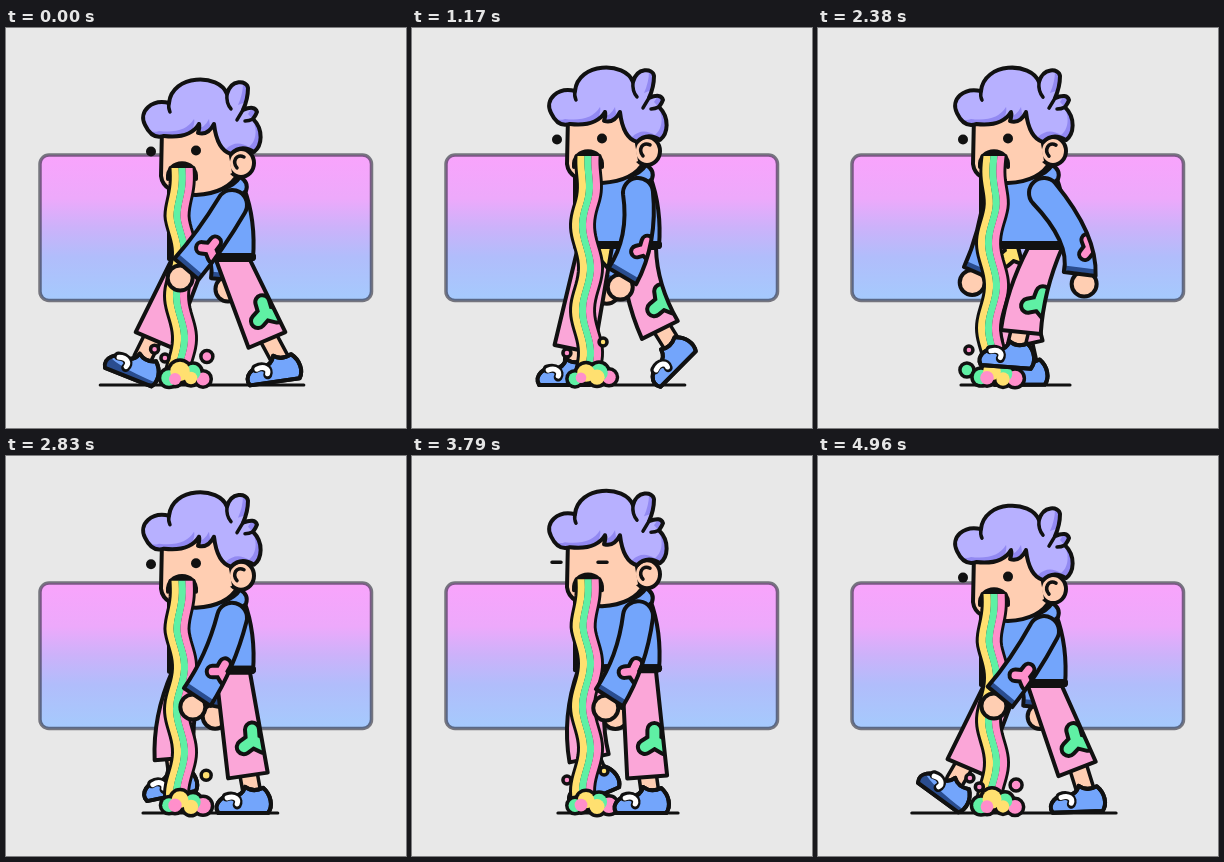
Animation of 400 by 400 pixels, one loop 5000 ms. Source, as an HTML page with a canvas:

```html
<!DOCTYPE html>
<html>
<head>
<meta charset="utf-8">
<style>
html, body { margin: 0; height: 100%; overflow: hidden; background: #e8e8e8; }
canvas { display: block; }
</style>
</head>
<body>
<canvas id="stage" width="400" height="400"></canvas>
<script>
const g = document.getElementById('stage').getContext('2d');
const INK = '#111', BLUE = '#73a5fb', NAVY = '#2a4d8f', SKIN = '#ffceb2', PINK = '#fba6d8';
const HOT = '#ff8fcb', MINT = '#5ff0a4', YELLOW = '#ffe070', HAIR = '#b7b0ff', HAIR_DARK = '#9289f2';
const TAU = Math.PI * 2;
g.lineJoin = g.lineCap = 'round';

// Periodic smooth interpolation; each row is [phase, ...values].
function key(rows, p) {
  const n = rows.length;
  const at = i => {
    const k = Math.floor(i / n), r = rows[i - k * n];
    return [r[0] + k, ...r.slice(1)];
  };
  p -= Math.floor(p);
  let i = n - 1;
  while (rows[i][0] > p) i--;
  const [a, b, c, d] = [at(i - 1), at(i), at(i + 1), at(i + 2)];
  const h = c[0] - b[0], u = (p - b[0]) / h;
  return b.slice(1).map((y, j) => {
    const z = c[j + 1];
    const m = (z - a[j + 1]) / (c[0] - a[0]) * h, q = (d[j + 1] - y) / (d[0] - b[0]) * h;
    return y + u * (m + u * (3 * (z - y) - 2 * m - q + u * (2 * (y - z) + m + q)));
  });
}

const BOB = [[0, 0], [.34, -12], [.54, -17], [.76, -12], [.92, -2]];
// foot x, y, tilt, hem x, y, knee bend
const STEP = [
  [0, 267, 341, -8, 261, 312, 0], [.17, 257, 332, -45, 248, 302, -10],
  [.25, 238, 331, -34, 230, 302, -13], [.38, 189, 326, 4, 203, 304, -8],
  [.46, 172, 331, 36, 192, 311, 0], [.5, 171, 337, 22, 192, 312, 0],
  [.67, 196, 344, 0, 206, 321, 0], [.79, 229, 344, 0, 235, 321, 0],
  [.96, 259, 343, -2, 259, 313, 0]];
const HAND = [[0, 174, 250], [.17, 208, 259], [.25, 240, 257], [.38, 266, 256],
  [.5, 276, 257], [.65, 245, 260], [.79, 194, 252], [.96, 176, 250]];
const FLOOR = [[0, 94, 298], [.17, 127, 273], [.25, 137, 260], [.38, 143, 252],
  [.5, 122, 276], [.63, 140, 266], [.79, 146, 266], [.96, 94, 298]];
// Bubbles: time, x, y, radius, colour
const BUBBLES = [
  [0, 159, 330, 4, HOT], [450, 200, 322, 5, MINT], [800, 152, 326, 5, YELLOW],
  [1170, 155, 325, 4, HOT], [1170, 191, 314, 4, YELLOW], [1550, 206, 332, 5, HOT],
  [2000, 203, 324, 5, HOT], [2000, 152, 342, 6, MINT], [2380, 151, 322, 4, HOT],
  [2380, 149, 342, 7, MINT], [2800, 198, 320, 5, YELLOW], [3250, 138, 343, 4, MINT],
  [3250, 169, 324, 6, YELLOW], [3250, 211, 342, 4, MINT], [3790, 155, 324, 4, HOT],
  [3790, 192, 315, 4, YELLOW], [4350, 150, 330, 5, MINT], [4600, 203, 326, 5, YELLOW],
  [4960, 198, 329, 6, HOT], [4960, 152, 322, 4, HOT]];

function draw(path, fill, width = 4, stroke = INK) {
  if (typeof path === 'string') path = new Path2D(path);
  if (fill) { g.fillStyle = fill; g.fill(path); }
  if (width) { g.lineWidth = width; g.strokeStyle = stroke; g.stroke(path); }
  return path;
}

function oval(x, y, rx, ry = rx) {
  const p = new Path2D();
  p.ellipse(x, y, rx, ry, 0, 0, TAU);
  return p;
}

function within(path, paint) {
  g.save();
  g.clip(path);
  paint();
  g.restore();
}

// Tapered tube from a to b, bent toward c; starts level or with a round cap.
function limb(a, c, b, w0, w1, round) {
  const normal = (p, q, w) => {
    const l = Math.hypot(q[0] - p[0], q[1] - p[1]);
    return [(q[1] - p[1]) / l * w, (p[0] - q[0]) / l * w];
  };
  const n = round ? normal(a, c, w0) : [w0, 0], e = normal(c, b, w1);
  const m = [(n[0] + e[0]) / 2, (n[1] + e[1]) / 2];
  const pt = (o, v, s) => `${o[0] + s * v[0]},${o[1] + s * v[1]} `;
  return new Path2D('M' + pt(a, n, -1) + 'Q' + pt(c, m, -1) + pt(b, e, -1) +
    'L' + pt(b, e, 1) + 'Q' + pt(c, m, 1) + pt(a, n, 1) +
    (round ? `A${w0},${w0} 0 0 0 ` + pt(a, n, -1) : '') + 'Z');
}

function patch(x, y, turn, color, size = 1) {
  g.save();
  g.translate(x, y);
  g.rotate(turn);
  g.scale(size, size);
  const p = 'M0,0L-10,5M0,0L1,-11M0,0L10,7';
  draw(p, null, 10 + 8 / size);
  draw(p, null, 10, color);
  g.restore();
}

function leg(p, dx, hip, color, place) {
  const [fx, fy, tilt, hx, hy, bend] = key(STEP, p);
  const x = fx + dx, hem = [hx + dx, hy];
  const knee = [(hip[0] + hem[0]) / 2 + bend, (hip[1] + hy) / 2];
  const ankle = `M${hem[0]},${hy - 5}L${x + 9},${fy - 6}`;
  draw(ankle, null, 21);
  draw(ankle, null, 14, SKIN);
  g.save();
  g.translate(x, fy);
  g.rotate(tilt * Math.PI / 180);
  const shoe = draw('M-25,13C-31,4 -20,-6 -9,-4Q-1,-4 2,-13Q10,-7 20,-12C28,-5 30,6 25,13Z', BLUE);
  if (tilt > 5) within(shoe, () => draw('M-32,2Q-22,12 28,13', null, 10, NAVY));
  draw(shoe);
  draw('M-17,-3C-8,-6 -3,0 -6,5', null, 9);
  draw('M-16,-2C-8,-5 -4,0 -6,4', null, 5, '#fff');
  g.restore();
  const pants = draw(limb(hip, knee, hem, 17, 20), PINK, 0);
  const at = i => hip[i] + (hem[i] - hip[i]) * place;
  within(pants, () => patch(at(0) + 10, at(1), (hip[0] - hem[0]) / 90, color));
  draw(pants);
}

function arm(shoulder, hand, forward, w, spot) {
  const dx = hand[0] - shoulder[0], dy = hand[1] - shoulder[1], l = Math.hypot(dx, dy);
  const s = (l - 11) / l, bend = 4 + 16 * (1 - Math.max(0, forward));
  const end = [shoulder[0] + dx * s, shoulder[1] + dy * s];
  const elbow = [shoulder[0] + dx * .5 + bend, shoulder[1] + dy * .5];
  draw(oval(...hand, 12.5), SKIN);
  const sleeve = draw(limb(shoulder, elbow, end, w, w + 1, true), BLUE, 0);
  within(sleeve, () => {
    const ex = end[0] - elbow[0], ey = end[1] - elbow[1], el = Math.hypot(ex, ey);
    const ux = ex / el, uy = ey / el, cx = end[0] - ux * 4, cy = end[1] - uy * 4;
    draw(`M${cx - uy * 20},${cy + ux * 20}L${cx + uy * 20},${cy - ux * 20}`, null, 5, NAVY);
    if (spot) patch(shoulder[0] + dx * .6 + bend * .8 + 6, shoulder[1] + dy * .6, -dx / 90, HOT, .75);
  });
  draw(sleeve);
}

function card() {
  const p = new Path2D();
  p.roundRect(34, 127, 331.5, 145.5, 9);
  const fill = g.createLinearGradient(0, 127, 0, 272);
  [[0, '#f9a4fc'], [.3, '#eda9fb'], [.5, '#ccb2fa'], [.7, '#b1bdfb'], [1, '#a5cafd']]
    .forEach(s => fill.addColorStop(...s));
  draw(p, fill, 3.5, 'rgba(35,35,50,.58)');
}

function head(shut) {
  draw('M156,100L155,148Q157,166 190,167Q222,165 232,146L246,112L200,80Z', SKIN);
  draw('M217,161Q229,157 234,149Q243,154 240,163Q232,172 217,174', BLUE);
  draw(oval(235, 135, 13, 14), SKIN);
  draw('M222,122L226,145L216,150V118Z', SKIN, 0);
  draw('M238,129C230,125 226,134 231,140', null, 3.5);
  const hair = new Path2D('M139,97C132,83 146,71 163,75C166,46 213,45 221,66' +
    'C225,51 241,52 242,60Q242,71 237,82Q249,77 251,84Q250,87 247,91' +
    'C258,102 256,118 248,124Q235,116 225,126Q211,122 208,96Q202,108 192,105' +
    'Q194,99 193,96Q184,111 158,108Q146,112 139,97Z');
  draw(hair, HAIR_DARK, 0);
  within(hair, () => {
    g.translate(-5, -5);
    draw(hair, HAIR, 0);
  });
  draw(hair);
  draw('M221,66Q220,75 225,81M237,82L231,92M247,91Q243,93 239,93M163,75Q162,80 164,84', null, 3.5);
  if (shut) draw('M140,123H149M186,123H195', null, 3.5);
  else [[145, 123.5], [190, 122.5]].forEach(e => draw(oval(...e, 5), INK, 0));
  draw('M162,151C160,130 192,130 190,151', INK);
}

function stream(p, top) {
  const mid = y => 176 + Math.min(1, (y - top) / 50) *
    (4 * Math.sin(TAU * (y / 85 - p - .4)) - 1.5);
  const band = (from, to) => {
    const s = [], r = [];
    for (let y = top; y <= 349; y += 4) {
      s.push(`${mid(y) + from},${y}`);
      r.unshift(`${mid(y) + to},${y}`);
    }
    return 'M' + s.concat(r).join('L') + 'Z';
  };
  draw(band(-11.5, 11.5), INK);
  [YELLOW, MINT, HOT].forEach((c, i) => draw(band(i * 7 - 10.5, i * 7 - 3.4), c, 0));
}

function puddle(t) {
  const w = i => Math.sin(TAU * (t / 500 + i * .3));
  const blobs = [[163, 350, 7, MINT], [197, 350, 7, HOT], [187, 345, 8, MINT],
    [174, 344, 9, YELLOW], [169, 350, 6, HOT], [185, 350, 7, YELLOW]]
    .map(([x, y, r, c], i) => [oval(x, y + w(i), r + w(i + 1) * .8), c]);
  for (const [T, x, y, r, c] of BUBBLES) {
    const u = .6 + (((t - T + 7500) % 5000) - 2500) / 500;
    if (u < 0 || u > 1) continue;
    const rise = u * (1.5 - u) / .54;
    const b = oval(177 + (x - 177) * u / .6, 347 + (y - 347) * rise, r * Math.min(1, (1 - u) * 4));
    draw(b, c, 3.5);
  }
  blobs.forEach(b => draw(b[0], null, 7));
  blobs.forEach(b => draw(b[0], b[1], 0));
}

function frame(now) {
  const t = now % 5000, p = t / 1000 % 1;
  const [bob] = key(BOB, p * 2), [x0, x1] = key(FLOOR, p);
  const raised = paint => {
    g.save();
    g.translate(0, bob);
    paint();
    g.restore();
  };
  g.fillStyle = '#e8e8e8';
  g.fillRect(0, 0, 400, 400);
  card();
  const near = key(HAND, p), far = key(HAND, p + .5);
  const forward = hand => (226 - hand[0]) / 52;
  arm([178, 174 + bob], [186 + (far[0] - 226) * .72, far[1] + 4], forward(far), 11, false);
  leg(p + .5, -44, [183, 231 + bob], YELLOW, .06);
  draw(`M${x0},357H${x1}`, null, 3);
  raised(() => {
    draw('M163,155V231H247Q250,192 238,160Z', BLUE);
    draw('M165,229H246', null, 8);
    head(t > 3690 && t < 3850);
  });
  stream(p, 140 + bob);
  puddle(t);
  leg(p, 0, [227, 232 + bob], MINT, .66);
  raised(() => draw('M194,229H246', null, 8));
  arm([226, 177 + bob], near, forward(near), 15, true);
  requestAnimationFrame(loop);
}

const start = performance.now();
function loop() { frame(performance.now() - start); }
loop();
</script>
</body>
</html>
```
